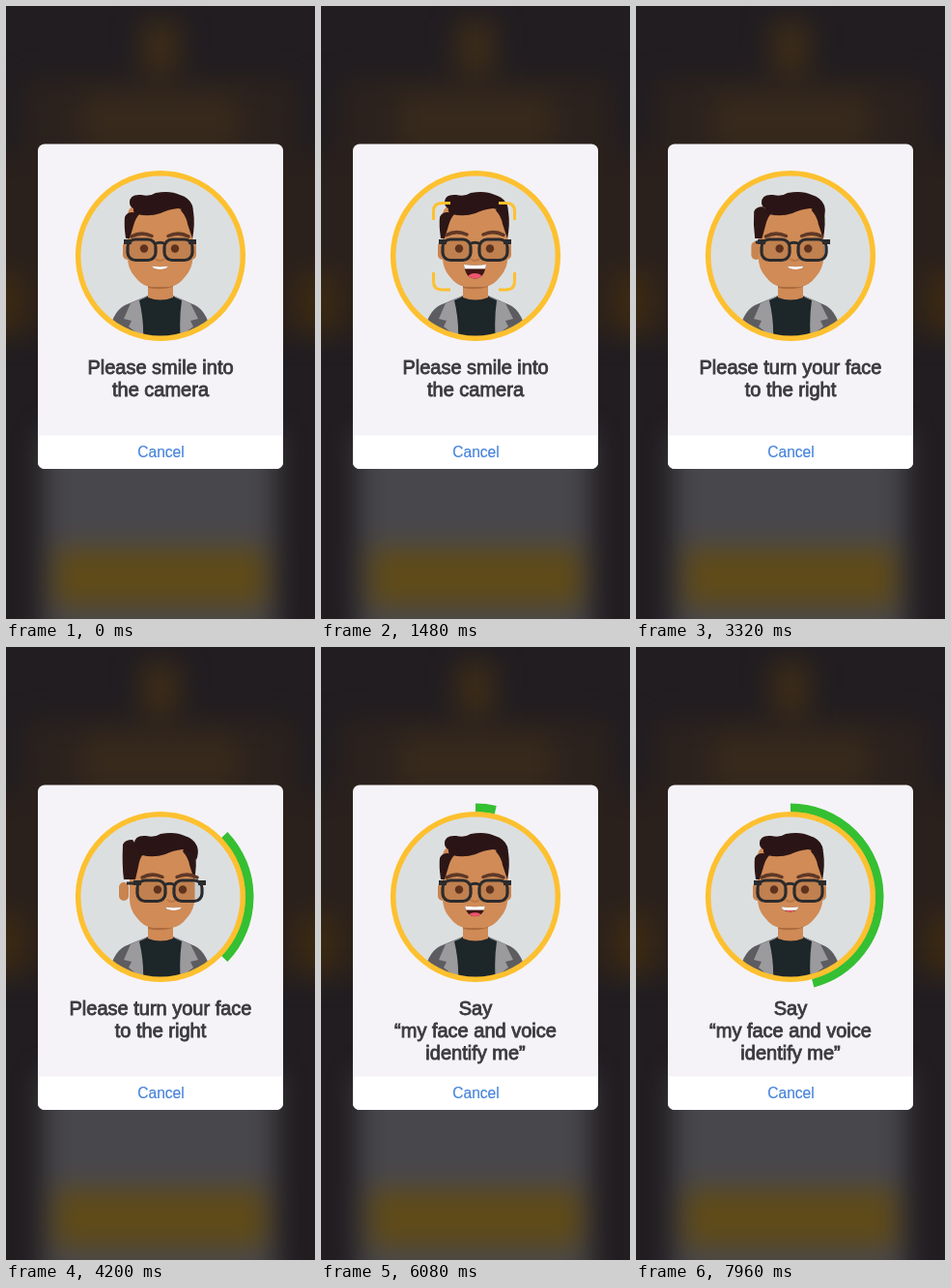
These frames come from a looping animation (320x633 px, 8000 ms). An HTML page:

```html
<!DOCTYPE html>
<html lang="en">
<head>
<meta charset="utf-8">
<title>Face check</title>
<style>
html, body { margin: 0; height: 100%; overflow: hidden; background: #211d21; }
svg { display: block; width: 100vw; height: 100vh; }
text { font-family: "Liberation Sans", Arial, sans-serif; text-anchor: middle; }
.msg { font-size: 20px; fill: #3b3a3f; stroke: #3b3a3f; stroke-width: .85; }
.cancel { font-size: 15.6px; fill: #4583dc; stroke: #4583dc; stroke-width: .2; }
.arc { fill: none; stroke: #35bf32; stroke-width: 9; }
</style>
</head>
<body>
<svg viewBox="0 0 320 633">
  <defs>
    <filter id="blur" filterUnits="userSpaceOnUse" x="-80" y="-80" width="480" height="800" color-interpolation-filters="sRGB">
      <feGaussianBlur stdDeviation="14"/>
    </filter>
    <clipPath id="disc"><circle cx="160" cy="258" r="84"/></clipPath>
    <clipPath id="lips"><path id="lipClip"/></clipPath>
  </defs>

  <rect width="320" height="633" fill="#211d21"/>
  <g filter="url(#blur)">
    <rect x="20" y="75" width="280" height="120" fill="#2c221d"/>
    <rect x="80" y="90" width="160" height="80" fill="#37291c"/>
    <rect x="140" y="15" width="40" height="55" fill="#3d2c18"/>
    <rect x="-40" y="150" width="400" height="190" fill="#2a201c"/>
    <rect x="-40" y="275" width="60" height="65" fill="#3a2913"/>
    <rect x="300" y="275" width="60" height="65" fill="#3a2913"/>
    <rect x="38" y="440" width="242" height="250" fill="#48474b"/>
    <rect x="50" y="560" width="220" height="60" fill="#5f4a18"/>
  </g>

  <rect x="33" y="142.500" width="254" height="335.500" rx="7" fill="#f5f3f7"/>
  <path d="M33 443.500H287V471a7 7 0 0 1-7 7H40a7 7 0 0 1-7-7Z" fill="#fff"/>
  <text class="cancel" x="160.500" y="465.500">Cancel</text>

  <g transform="rotate(-90 160 258)">
    <circle id="turnArc" class="arc" cx="160" cy="258" r="92" pathLength="360" stroke-dasharray="0 46 88 226"/>
    <circle id="voiceArc" class="arc" cx="160" cy="258" r="92" pathLength="360"/>
  </g>
  <circle cx="160" cy="258" r="84" fill="#dcdfe0"/>

  <g clip-path="url(#disc)">
    <path d="M105 348Q108 317 123 309L147 299H173L196 309Q211 317 214 348Z" fill="#5d5c61"/>
    <path d="M145 300L129 307L122 323L130 325L127 331L146 346V302ZM175 300L191 307L199 323L191 325L194 331L174 346V302Z" fill="#9b9a9d"/>
    <path d="M138 304L147 300H173L182 304Q179 324 181 346H142Q143 324 138 304Z" fill="#1d2629"/>
    <path d="M147 280V301Q160 306 173 301V280Z" fill="#cf8a55"/>
    <path d="M147 288H173V290Q160 294 147 291Z" fill="#ad6c3f"/>

    <rect data-k="-4" x="121" y="243" width="10" height="19" rx="5" fill="#c98450"/>
    <rect data-k="-5" x="187" y="243" width="10" height="19" rx="5" fill="#c98450"/>
    <path data-k="2" d="M126 214Q128 205 140 204H180Q193 205 193.500 220V260Q193 271 186 279Q178 289.500 169 290H150Q141 289.500 133 279Q126 271 126 260Z" fill="#d08b56"/>
    <path id="sideHair" fill="#2c1616"/>
    <path data-k="2" d="M193 240Q196 226 194 212L183 207L181 211Q187 218 188 225Z" fill="#2c1616"/>
    <path data-k="5" d="M128 203Q128 194 140 195Q149 197 155 193Q170 190 180 195Q190 198 193 206Q195 213 192 220Q188 210 178 209Q168 210 160 214Q148 218 136 215Q131 214 132 209Q128 207 128 203Z" fill="#2a1415"/>

    <path id="temple" stroke="#2b2b2d" stroke-width="3"/>
    <g id="brows" fill="none" stroke="#5f3826" stroke-width="3.500" stroke-linecap="round">
      <path data-k="11" d="M130 238Q140 232.500 151 237.500"/>
      <path data-k="9" d="M168 237.500Q179 232.500 189 238"/>
    </g>
    <circle data-k="14" cx="143" cy="250.500" r="4.200" fill="#66361f"/>
    <circle data-k="8" cx="175" cy="250.500" r="4.200" fill="#66361f"/>
    <path data-k="12" d="M155 261Q159.500 265 164 261" fill="none" stroke="#bd7846" stroke-width="2"/>
    <g data-k="10" fill="#000" fill-opacity=".08" stroke="#2b2b2d" stroke-width="3.200">
      <rect x="126" y="241" width="29" height="21.500" rx="8"/>
      <rect x="164" y="241" width="29" height="21.500" rx="8"/>
      <path d="M154 246Q159.500 242.500 165 246" fill="none"/>
      <path d="M122 243.500H130M189 243.500H197" stroke-width="5"/>
    </g>
    <g data-k="14">
      <path id="lipFill" fill="#401613"/>
      <g clip-path="url(#lips)">
        <ellipse id="tongue" cx="159.500" rx="7.500" ry="4.500" fill="#f0546d"/>
        <rect id="teeth" x="145" y="260" width="30" fill="#fff"/>
      </g>
    </g>
    <path id="frame" d="M116.500 221V212Q116.500 203.500 125 203.500H134M184 203.500H192Q200.500 203.500 200.500 212V221M200.500 275V284Q200.500 293 192 293H184M134 293H125Q116.500 293 116.500 284V275" fill="none" stroke="#fdc02f" stroke-width="3"/>
  </g>
  <circle cx="160" cy="258" r="85.300" fill="none" stroke="#fdc02f" stroke-width="5.500"/>

  <g class="msg">
    <g id="smileMsg"><text x="160" y="380">Please smile into</text><text x="160" y="403">the camera</text></g>
    <g id="turnMsg"><text x="160" y="380">Please turn your face</text><text x="160" y="403">to the right</text></g>
    <g id="sayMsg"><text x="160" y="380">Say</text><text x="160" y="403">“my face and voice</text><text x="160" y="426">identify me”</text></g>
  </g>
</svg>
<script>
const LOOP = 8000;
const $ = id => document.getElementById(id);
const movers = [...document.querySelectorAll('[data-k]')];

// Eased 0..1 between two times
const ramp = (t, a, b) => {
  const x = Math.min(1, Math.max(0, (t - a) / (b - a)));
  return x * x * (3 - 2 * x);
};
const pulse = (t, a, b, c, d) => ramp(t, a, b) - ramp(t, c, d);
const show = (id, opacity) => $(id).setAttribute('opacity', opacity);

function drawMouth(open) {
  const w = 8.5 + open * 3, top = 268.5 - open * 1.5;
  const bottom = top + 3.5 + open * 11;
  const d = `M${159.5 - w} ${top}Q159.5 ${top + 1.5} ${159.5 + w} ${top}` +
    `Q${159.5 + w * .85} ${bottom} 159.5 ${bottom}` +
    `Q${159.5 - w * .85} ${bottom} ${159.5 - w} ${top}Z`;
  $('lipFill').setAttribute('d', d);
  $('lipClip').setAttribute('d', d);
  $('teeth').setAttribute('height', top - 260 + 3.4 + open);
  $('tongue').setAttribute('cy', bottom + 3.5 - open * 4.5);
}

// The hair behind the temple swells as the head turns away from it
function drawSideHair(u) {
  const left = 123 - 2 * u, top = 213 - 14 * u;
  $('sideHair').setAttribute('d',
    `M${left + 1} 240Q${left - 1} 226 ${left} ${top + 5}Q${left + 2} ${top} 131 ${top}` +
    `L${139 + 3 * u} 214Q${134 + 4 * u} 219 ${132 + 5 * u} 227L${128 + 6 * u} 240Z`);
}

function draw(t) {
  const turn = pulse(t, 2950, 3800, 4380, 4760);
  for (const el of movers) el.setAttribute('transform', `translate(${el.dataset.k * turn} 0)`);
  drawSideHair(turn);
  $('temple').setAttribute('d', `M${123 + 2 * turn} 244H${125 + 10 * turn}`);

  const smile = pulse(t, 850, 1200, 2100, 2400);
  $('brows').setAttribute('transform', `translate(0 ${-1.5 * smile})`);
  const speaking = pulse(t, 5820, 5900, 7960, 8040);
  const syllable = .5 + .5 * Math.cos((t - 6080) / 418 * 2 * Math.PI);
  const twitch = t >= 5520 && t < 5560 ? .15 : 0;
  drawMouth(smile + speaking * (.15 + .5 * syllable) + twitch);

  show('frame', pulse(t, 450, 750, 2150, 2400));
  show('turnArc', pulse(t, 3700, 3950, 4380, 4640));
  const angle = Math.max(0, (t - 5920) * .081);
  $('voiceArc').setAttribute('stroke-dasharray', `${angle} 360`);
  show('voiceArc', angle ? 1 : 0);

  show('smileMsg', 1 - ramp(t, 2520, 2640));
  show('turnMsg', pulse(t, 2560, 2680, 5040, 5160));
  show('sayMsg', ramp(t, 5080, 5200));
}

function tick() {
  draw(performance.now() % LOOP);
  requestAnimationFrame(tick);
}
tick();
</script>
</body>
</html>
```
